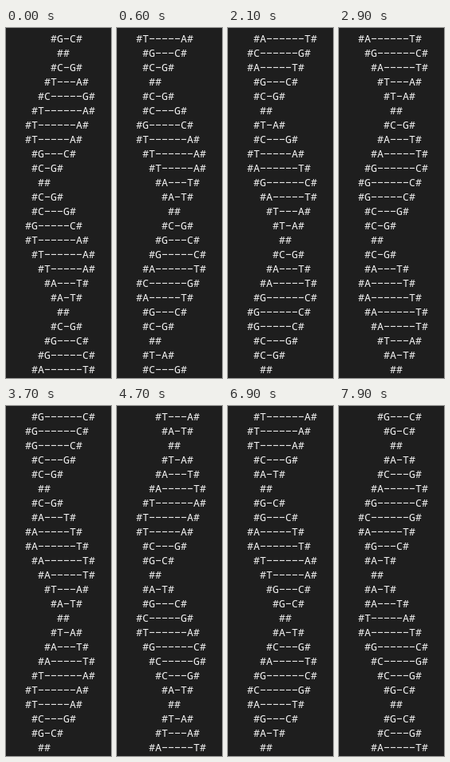
Write an HTML page that moves like this. It is 132x438 px and loops after 8000 ms.

```html
<!DOCTYPE html>
<html lang="en">
<head>
<meta charset="utf-8">
<title>DNA</title>
<style>
html, body { margin: 0; width: 100%; height: 100%; overflow: hidden; background: #1e1e1e; }
pre {
  position: absolute; left: 24px; top: 4px; margin: 0;
  font: 13.3333px/18px "Noto Sans Mono", monospace;
  font-variant-ligatures: none;
  color: #f2f2f2;
}
</style>
</head>
<body>
<pre id="helix"></pre>
<script>
const LOOP = 8000, STEP = 100, VISIBLE = 24;
const LINES_PER_STEP = 1.125, OFFSET = 0.25;

// Shape of one full twist: indent per row, and dashes per half twist.
const INDENT = [5, 4, 3, 2, 1, 0, 0, 1, 1, 2, 1, 1, 0, 0, 1, 2, 3, 4];
const DASHES = [0, 1, 3, 5, 6, 6, 5, 3, 1];
const DASH = '\u2212'; // wide dash at mid-capital height
const PAIR = { A: 'T', T: 'A', C: 'G', G: 'C' };

// Left-hand base of every row; a dot marks a crossing.
const BASES = 'G.CTCTTTGC.CCGTTTAA.CGGA' + 'CAGC.TCTAGATT.' + 'CAAGGGCC.' +
  'CAAAAATA.TAATTTCG.' + 'AGCTGCCA.TTA' + 'TTTCA.GGAATTG' + 'G.ACAGCAGA.AATAGCCG.GCA';

const rows = [...BASES].map((base, i) => {
  const phase = (i + 17) % 18;
  const rung = base === '.' ? '' : base + DASH.repeat(DASHES[phase % 9]) + PAIR[base];
  return ' '.repeat(INDENT[phase]) + '#' + rung + '#';
});

const helix = document.getElementById('helix');
let shown = -1;

function draw() {
  const step = Math.floor(performance.now() % LOOP / STEP);
  const first = Math.floor(step * LINES_PER_STEP + OFFSET);
  if (first !== shown) {
    helix.textContent = rows.slice(first, first + VISIBLE).join('\n');
    shown = first;
  }
  requestAnimationFrame(draw);
}
draw();
</script>
</body>
</html>
```
